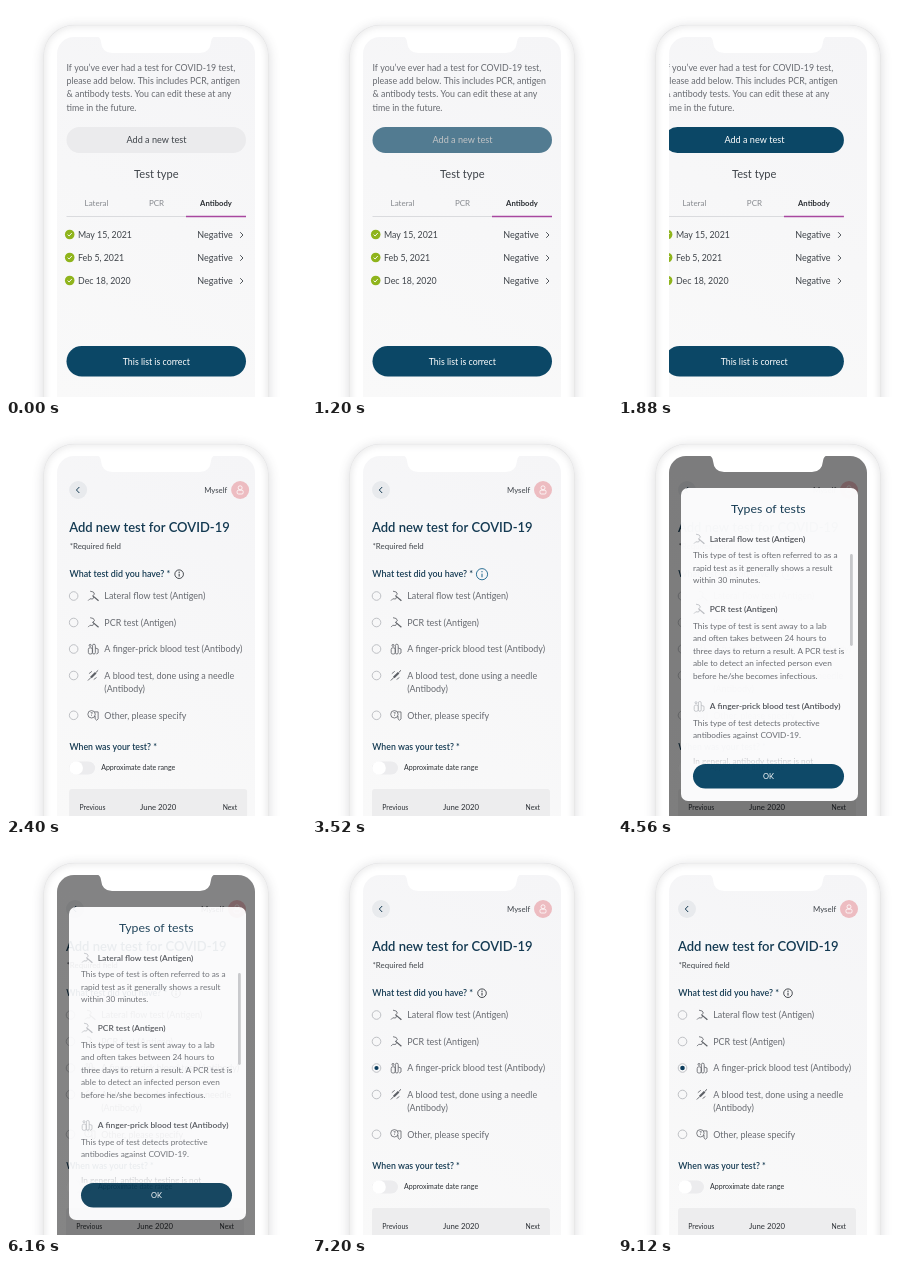
Recreate the animation shown at these times as an HTML page with a canvas. Size 300 px wide and 391 px high, loop 9.56 s.

```html
<!DOCTYPE html>
<html lang="en">
<head>
<meta charset="utf-8">
<title>Adding a test</title>
<style>
html, body { margin: 0; width: 100%; height: 100%; overflow: hidden; background: #fff; }
canvas { display: block; }
</style>
</head>
<body>
<canvas id="stage" width="300" height="391"></canvas>
<script>
const LOOP = 9560, STEP = 40, PUSH = 212;
const BLUE = '#0b4766', NAVY = '#143a52', INK = '#3f444a', GREY = '#676a70';
const stage = document.getElementById('stage').getContext('2d');
const layerCanvas = document.createElement('canvas');
layerCanvas.width = 300;
layerCanvas.height = 391;
const layer = layerCanvas.getContext('2d');
let c = stage;

const clamp = v => Math.max(0, Math.min(1, v));
const span = (t, a, b) => clamp((t - a) / (b - a));
const smooth = p => p * p * (3 - 2 * p);
const easeInOut = (p, n) => p < .5 ? (2 * p) ** n / 2 : 1 - (2 - 2 * p) ** n / 2;
const mix = (a, b, p) => `rgb(${a.map((v, i) => Math.round(v + (b[i] - v) * p))})`;

// y is the middle of the capitals
function text(str, x, y, size, color = GREY, weight = 400, align = 'left') {
  c.font = `${weight} ${size}px Lato, sans-serif`;
  c.textAlign = align;
  c.fillStyle = color;
  c.fillText(str, x, y + size * .35);
}

function box(x, y, w, h, r, fill) {
  c.beginPath();
  c.roundRect(x, y, w, h, r);
  c.fillStyle = fill;
  c.fill();
}

function disc(x, y, r, fill) {
  c.beginPath();
  c.arc(x, y, r, 0, 7);
  c.fillStyle = fill;
  c.fill();
}

function ring(x, y, r, color, width = .8) {
  c.beginPath();
  c.arc(x, y, r, 0, 7);
  c.strokeStyle = color;
  c.lineWidth = width;
  c.stroke();
}

function frame(x, y, w, h, r, color, width = .8) {
  c.beginPath();
  c.roundRect(x, y, w, h, r);
  c.strokeStyle = color;
  c.lineWidth = width;
  c.stroke();
}

function line(points, color, width = 1) {
  c.beginPath();
  points.forEach(([x, y]) => c.lineTo(x, y));
  c.strokeStyle = color;
  c.lineWidth = width;
  c.stroke();
}

function at(x, y, draw) {
  c.save();
  c.translate(x, y);
  draw();
  c.restore();
}

function swab(color) {
  line([[-3, -4.8], [.2, -4], [1.4, -1.8], [-.4, -.4]], color, .8);
  line([[-5, 4.6], [-3.2, 2.8], [-.4, 3], [.6, 1]], color, .8);
  line([[-.6, -.4], [5.4, 4.8]], color, 1.2);
}

function finger(color) {
  frame(-4.8, -1.2, 4, 6.2, 1.6, color);
  frame(-.6, -4.8, 2.8, 9.8, 1.4, color);
  line([[2.2, -1], [5, 0], [5, 4], [3.2, 5]], color, .8);
  ring(-3, -3.6, 1, color);
}

function needle(color) {
  line([[-5.2, 5], [-2, 1.8]], color, .9);
  line([[-2.2, 2], [2.6, -2.8]], color, 2.2);
  line([[2.6, -2.8], [5, -5.2]], color, 1);
  line([[-4.2, -1.8], [-1.2, -4.2]], color, .8);
  line([[.6, 4], [3.4, 2]], color, .8);
}

function other(color) {
  ring(-1.6, -1, 3.7, color);
  text('?', -1.6, -1, 5.5, color, 700, 'center');
  line([[1.6, -3.4], [5, -3.4], [5, 3.6], [3.6, 5], [2, 3.6], [2, .8]], color, .8);
}

function phone() {
  c.fillStyle = '#fff';
  c.fillRect(0, 0, 300, 391);
  c.save();
  c.shadowColor = 'rgba(60,60,70,.2)';
  c.shadowBlur = 12;
  c.shadowOffsetY = 2;
  box(37.5, 19, 225, 440, 31, '#fff');
  c.restore();

  // soft shading inside the rim
  c.save();
  c.beginPath();
  c.roundRect(37.5, 19, 225, 440, 31);
  c.clip();
  c.shadowColor = 'rgba(90,90,95,.45)';
  c.shadowBlur = 6;
  frame(37, 18.5, 226, 441, 31.5, '#dcdcdd', 1.6);
  c.restore();
}

function notch() {
  c.beginPath();
  c.moveTo(90, 30);
  c.quadraticCurveTo(94.5, 31, 95, 36);
  c.quadraticCurveTo(96, 47, 106, 47);
  c.lineTo(194, 47);
  c.quadraticCurveTo(204, 47, 205, 36);
  c.quadraticCurveTo(205.5, 31, 210, 30);
  c.fillStyle = '#fff';
  c.fill();
}

function listScreen(press) {
  ['If you’ve ever had a test for COVID-19 test,',
   'please add below. This includes PCR, antigen',
   '& antibody tests. You can edit these at any',
   'time in the future.'].forEach((s, i) => text(s, 60.5, 62 + i * 13.2, 8.85));

  box(60.5, 121, 179.5, 26, 13, mix([235, 235, 237], [11, 71, 102], press));
  text('Add a new test', 150.5, 133.5, 9.1, mix([63, 68, 74], [255, 255, 255], press), 400, 'center');
  text('Test type', 150.3, 168.5, 11.1, INK, 400, 'center');

  text('Lateral', 90.5, 197.5, 8, '#85888d', 400, 'center');
  text('PCR', 150.5, 197.5, 8, '#85888d', 400, 'center');
  text('Antibody', 210, 197.5, 7.7, '#2c3035', 700, 'center');
  line([[60.5, 210.5], [180, 210.5]], '#dadbde', 1);
  line([[180, 210.5], [240, 210.5]], '#a8479f', 1.5);

  ['May 15, 2021', 'Feb 5, 2021', 'Dec 18, 2020'].forEach((day, i) => {
    const y = 229 + i * 23;
    disc(63.7, y - .5, 4.8, '#8fb41c');
    line([[61.6, y - .4], [63.1, y + 1], [65.8, y - 2]], '#fff', .9);
    text(day, 72, y + .4, 8.8, INK);
    text('Negative', 191.3, y - .3, 9, INK);
    line([[234.2, y - 2.8], [237, y], [234.2, y + 2.8]], INK, .9);
  });

  box(60.5, 340, 179.5, 30.5, 15.25, BLUE);
  text('This list is correct', 150.3, 355.5, 8.8, '#fff', 400, 'center');
}

function formScreen(hover, dot) {
  disc(69, 65, 9, '#e8eaed');
  line([[70.2, 62], [67.3, 65], [70.2, 68]], NAVY, 1);
  text('Myself', 195, 65.3, 7.8, INK);
  disc(231, 65, 9, '#edbcc1');
  ring(231, 62.8, 2, '#fff', .8);
  frame(228, 65.2, 6, 3.8, 1.2, '#fff', .8);

  text('Add new test for COVID-19', 60, 102.8, 13, NAVY, 600);
  text('*Required field', 60.5, 121.2, 7.9, INK);
  text('What test did you have? *', 60.3, 148.9, 8.9, NAVY, 600);

  const tone = mix([52, 56, 62], [26, 100, 140], hover);
  const r = 4.3 + 1.3 * hover;
  ring(170, 149.2, r, tone, .9);
  line([[170, 148.7], [170, 149.2 + r * .55]], tone, 1);
  disc(170, 149.2 - r * .45, .65, tone);

  const rows = [
    [171, swab, 'Lateral flow test (Antigen)'],
    [197.5, swab, 'PCR test (Antigen)'],
    [224, finger, 'A finger-prick blood test (Antibody)'],
    [250.5, needle, 'A blood test, done using a needle'],
    [290.3, other, 'Other, please specify']
  ];
  rows.forEach(([y, icon, label]) => {
    ring(64.5, y, 4.3, '#b0b3b8');
    at(84, y, () => icon('#5d6066'));
    text(label, 95.2, y + .3, 8.93);
  });
  text('(Antibody)', 95.2, 264, 8.93);
  if (dot > 0) disc(64.5, 224, 2.3 * dot, '#0b3c5c');

  text('When was your test? *', 60.3, 321.5, 8.75, NAVY, 600);
  box(60, 336.5, 26, 13, 6.5, '#ececee');
  disc(67, 343, 6.8, '#fff');
  text('Approximate date range', 92, 342.8, 7.05, '#2c3035');

  box(60, 364, 178, 40, 3, '#ededee');
  text('Previous', 70.3, 382.4, 6.9, '#2c3035');
  text('June 2020', 149, 382.2, 7.8, '#2c3035', 400, 'center');
  text('Next', 228, 382.4, 6.8, '#2c3035', 400, 'right');
}

function modal(press) {
  c.fillStyle = 'rgba(0,0,0,.5)';
  c.fillRect(0, 0, 300, 391);
  box(63, 63, 177, 313, 7, '#fafafb');
  text('Types of tests', 150.3, 83.7, 12.3, NAVY, 400, 'center');

  const sections = [
    [114, 130.3, swab, 'Lateral flow test (Antigen)',
      ['This type of test is often referred to as a', 'rapid test as it generally shows a result', 'within 30 minutes.']],
    [184, 200.7, swab, 'PCR test (Antigen)',
      ['This type of test is sent away to a lab', 'and often takes between 24 hours to',
       'three days to return a result. A PCR test is', 'able to detect an infected person even', 'before he/she becomes infectious.']],
    [281.3, 297.7, finger, 'A finger-prick blood test (Antibody)',
      ['This type of test detects protective', 'antibodies against COVID-19.']]
  ];
  sections.forEach(([y, top, icon, title, lines]) => {
    at(81, y, () => icon('#b9bbc0'));
    text(title, 91.7, y, 8.4, '#4c4f55', 600);
    lines.forEach((s, i) => text(s, 75, top + i * 12.6, 8.25));
  });

  const fade = c.createLinearGradient(0, 330, 0, 341);
  fade.addColorStop(0, '#b4b6ba');
  fade.addColorStop(1, '#ececee');
  text('In general, antibody testing is not', 75, 336.3, 8.25, fade);

  box(232, 129, 2.8, 92, 1.4, '#c6c7ca');
  box(75, 339, 151, 24.5, 12.25, mix([11, 71, 102], [7, 58, 86], press));
  text('OK', 150.5, 351.5, 7.5, '#fff', 400, 'center');
}

function render(t) {
  c = stage;
  phone();
  c.save();
  c.beginPath();
  c.roundRect(51, 31, 198, 420, 17);
  c.clip();
  const bg = c.createLinearGradient(51, 391, 249, 31);
  bg.addColorStop(0, '#f9f9f9');
  bg.addColorStop(1, '#f5f5f7');
  c.fillStyle = bg;
  c.fillRect(51, 31, 198, 360);

  const shift = PUSH * easeInOut(span(t, 1560, 2620), 4);
  if (shift < PUSH) at(-shift, 0, () => listScreen(smooth(span(t, 600, 1560))));
  if (shift > 0) {
    const hover = t < 4760 ? smooth(span(t, 2620, 3500)) : 0;
    const dot = t > 6980 ? 1 - Math.exp((6980 - t) / 90) : 0;
    at(PUSH - shift, 0, () => formScreen(hover, dot));
  }

  const shown = easeInOut(span(t, 3540, 4760), 3) * (1 - smooth(span(t, 5990, 7060)));
  if (shown > 0) {
    c = layer;
    c.clearRect(0, 0, 300, 391);
    modal(smooth(span(t, 5120, 6000)));
    c = stage;
    c.globalAlpha = shown;
    c.drawImage(layerCanvas, 0, 0);
  }
  c.restore();
  notch();
}

const start = performance.now();
function tick() {
  const t = (performance.now() - start) % LOOP;
  render(Math.floor(t / STEP) * STEP);
  requestAnimationFrame(tick);
}
tick();
</script>
</body>
</html>
```
